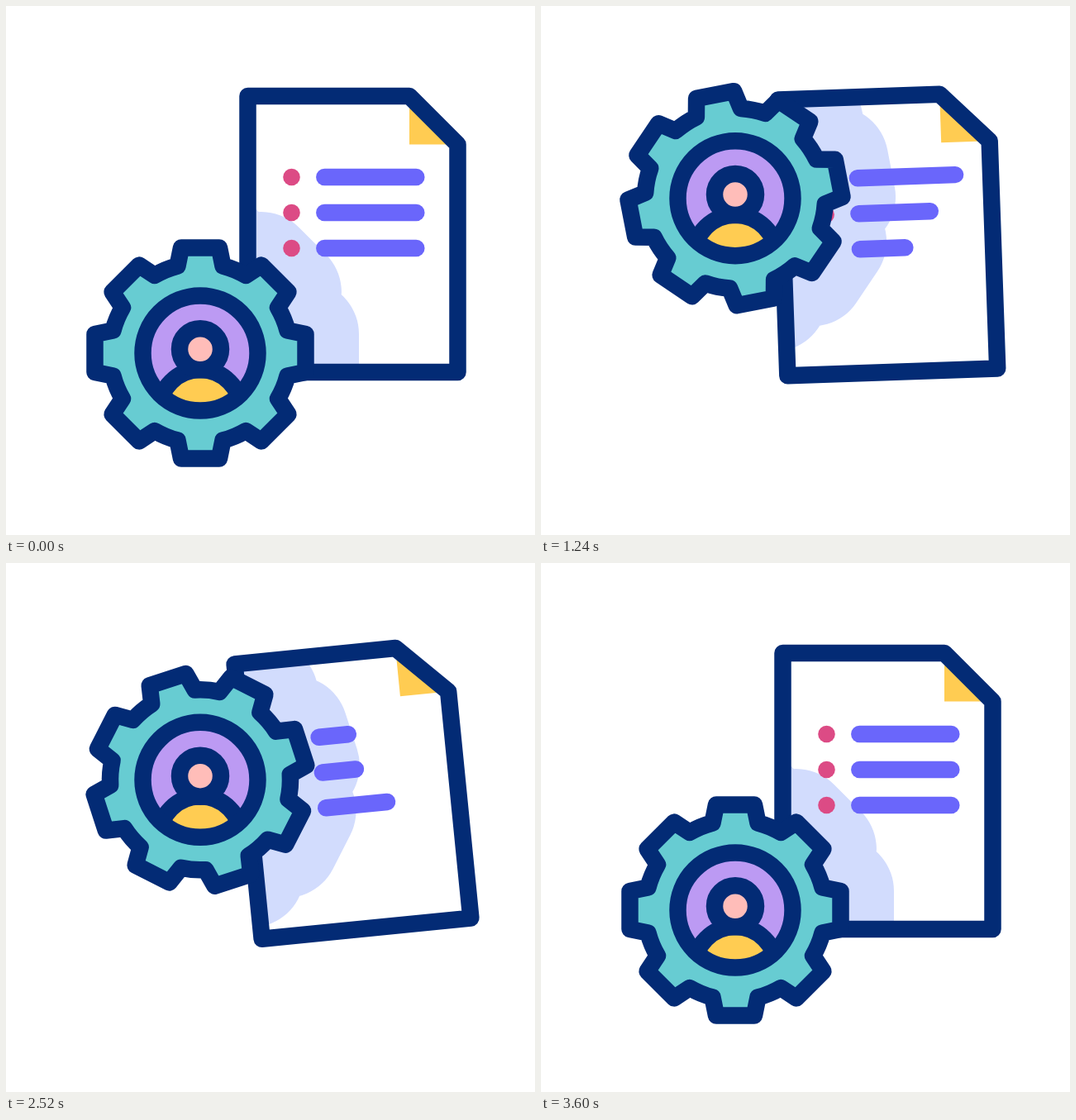
Animation of 640x640 px, one loop 3620 ms. Source, as an HTML page with a canvas:

```html
<!DOCTYPE html>
<html lang="en">
<head>
<meta charset="utf-8">
<title>Profile settings document</title>
<style>
  html, body { margin: 0; width: 100%; height: 100%; overflow: hidden; background: #fff; }
  canvas { display: block; width: 640px; height: 640px; }
</style>
</head>
<body>
<canvas id="stage" width="640" height="640"></canvas>
<script>
const ctx = document.getElementById('stage').getContext('2d');
const LOOP = 3620, STEP = 20, SPAN = 3600;
const STROKE = 20.5, TAU = Math.PI * 2, DEG = Math.PI / 180;
const NAVY = '#032b75', TEAL = '#67ccd2', PURPLE = '#bc9af3', YELLOW = '#ffcc52';
const PINK = '#ffbdb9', SHADE = '#d2dcfd', VIOLET = '#6a66fb', ROSE = '#dc4b85';

// Keys are [time, value] pairs.
const TILT = [[300, 0], [900, 10], [1500, -10], [2100, 10], [2700, -10], [3300, 0]];
const LIFT = [[0, 420], [1800, 176.7], [3600, 420]];
const STRETCH = [[402, 0], [712, 11.1], [975, -78], [1345, 28], [1530, 0]];
const REPEAT = 1512, LAG = 79, BAR = 111;

function track(keys, t) {
  if (t <= keys[0][0]) return keys[0][1];
  for (let i = 1; i < keys.length; i++) {
    const [t0, a] = keys[i - 1], [t1, b] = keys[i];
    if (t < t1) {
      const u = (t - t0) / (t1 - t0);
      return a + (b - a) * u * u * (3 - 2 * u);
    }
  }
  return keys[keys.length - 1][1];
}

function barLength(row, t) {
  const local = t - row * LAG;
  return BAR + track(STRETCH, local) + track(STRETCH, local - REPEAT);
}

function polygon(...points) {
  const path = new Path2D();
  points.forEach(([x, y]) => path.lineTo(x, y));
  path.closePath();
  return path;
}

function circle(x, y, r) {
  const path = new Path2D();
  path.arc(x, y, r, 0, TAU);
  return path;
}

function gearPath() {
  const path = new Path2D();
  const base = 14.6 * DEG, valley = 109, tip = 127.5, half = 23;
  const tipRadius = Math.hypot(tip, half), tipAngle = Math.atan2(half, tip);
  for (let i = 0; i < 8; i++) {
    const a = i * TAU / 8;
    for (const s of [-tipAngle, tipAngle]) {
      path.lineTo(tipRadius * Math.cos(a + s), tipRadius * Math.sin(a + s));
    }
    path.arc(0, 0, valley, a + base, a + TAU / 8 - base);
  }
  path.closePath();
  return path;
}

const PAGE = polygon([-127, -167], [68.5, -167], [127, -108.5], [127, 167], [-127, 167]);
const FOLD = polygon([68.5, -167], [68.5, -108.5], [127, -108.5]);
const GEAR = gearPath();
const RING = circle(0, 0, 69.5);
const HEAD = circle(0, -4.7, 25);
const BODY = circle(0, 70, 50);

function fill(path, color) {
  ctx.fillStyle = color;
  ctx.fill(path);
}

function stroke(path, color = NAVY, width = STROKE) {
  ctx.strokeStyle = color;
  ctx.lineWidth = width;
  ctx.stroke(path);
}

function placed(x, y, angle, draw) {
  ctx.save();
  ctx.translate(x, y);
  ctx.rotate(angle);
  draw();
  ctx.restore();
}

function drawPage(t, gearY, spin) {
  const tilt = track(TILT, t) * DEG;
  placed(419.5, 276, tilt, () => {
    fill(PAGE, '#fff');
    ctx.save();
    ctx.clip(PAGE);
    ctx.rotate(-tilt);
    ctx.translate(235 - 419.5, gearY - 276);
    ctx.rotate(spin);
    fill(GEAR, SHADE);
    stroke(GEAR, SHADE, 129);
    ctx.restore();

    fill(FOLD, YELLOW);
    for (let row = 0; row < 3; row++) {
      const y = -69 + row * 43;
      fill(circle(-74, y, 10.3), ROSE);
      const bar = new Path2D();
      bar.moveTo(-34.2, y);
      bar.lineTo(-34.2 + barLength(row, t), y);
      stroke(bar, VIOLET);
    }
    stroke(PAGE);
  });
}

function drawGear(y, spin) {
  placed(235, y, spin, () => {
    fill(GEAR, TEAL);
    stroke(GEAR);
  });
  placed(235, y, 0, () => {
    fill(RING, PURPLE);
    ctx.save();
    ctx.clip(RING);
    fill(BODY, YELLOW);
    stroke(BODY);
    ctx.restore();
    fill(HEAD, PINK);
    stroke(HEAD);
    stroke(RING);
  });
}

function draw(t) {
  ctx.fillStyle = '#fff';
  ctx.fillRect(0, 0, 640, 640);
  ctx.lineCap = ctx.lineJoin = 'round';
  const gearY = track(LIFT, t), spin = t / SPAN * TAU;
  drawPage(t, gearY, spin);
  drawGear(gearY, spin);
}

let start;
function tick(now) {
  start ??= now;
  draw(Math.floor(((now - start) % LOOP) / STEP) * STEP);
  requestAnimationFrame(tick);
}
draw(0);
requestAnimationFrame(tick);
</script>
</body>
</html>
```
